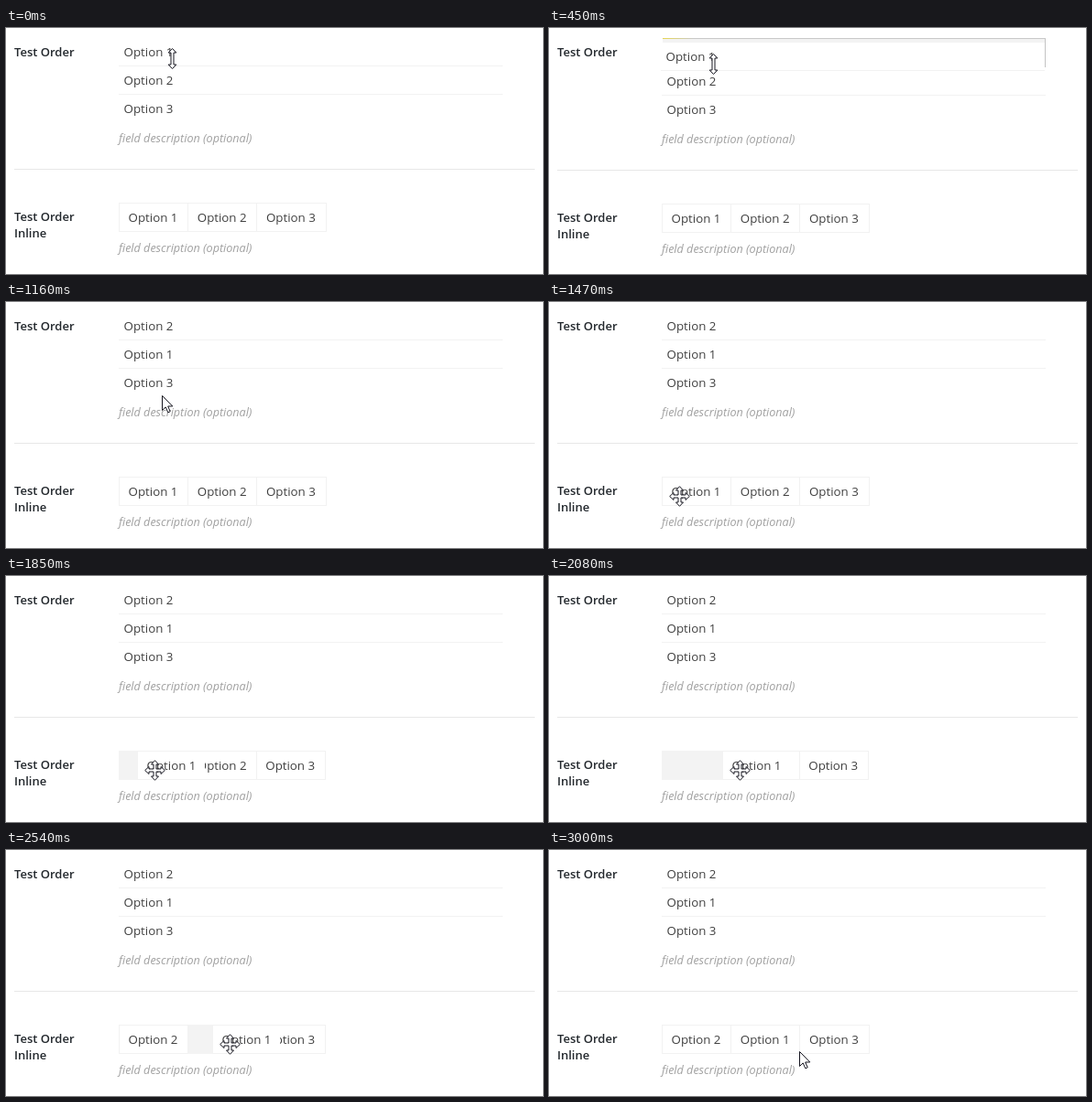
Recreate the animation shown at these times as an HTML page. Size 586 by 269 pixels, loop 3.08 s.

```html
<!DOCTYPE html>
<html lang="en">
<head>
<meta charset="utf-8">
<title>Sortable fields</title>
<style>
  html, body { margin: 0; width: 100%; height: 100%; overflow: hidden; background: #fff; }
  body { position: relative; font: 13.3px/30px "Open Sans", sans-serif; color: #404040; }
  div, svg { position: absolute; box-sizing: border-box; white-space: nowrap; }
  .label { left: 9px; font-size: 13px; line-height: 18px; font-weight: 600; color: #23282d; }
  .note { left: 123px; font-size: 12.6px; line-height: 18px; font-style: italic; color: #a0a0a0; }
  .rule { left: 9px; top: 154px; width: 568px; height: 1px; background: #e7e7e7; }
  .row { width: 419px; height: 31px; padding-left: 5.6px; background: #fff; border-bottom: 1px solid #f2f2f2; }
  .cell { top: 191px; width: 76.2px; height: 32px; padding-left: 9.6px; background: #fff; border: 1px solid #f2f2f2; }
  .cell.held { width: 74px; border-right: 0; z-index: 2; }
  .gap { background: #f3f3f3; }
  #rowGap { left: 124px; width: 418px; height: 32px; border-right: 1px solid #c4c4c4; }
  #rowGap div { left: 0; top: 0; width: 418px; height: 1px; }
  #cellGap { top: 191px; width: 76px; height: 32px; }
  svg { left: 0; top: 0; width: 100%; height: 100%; z-index: 3; }
  path { fill: #fff; stroke: #14141e; stroke-width: 1; }
</style>
</head>
<body>
<div class="label" style="top:17px">Test Order</div>
<div id="rowGap" class="gap"><div></div></div>
<div id="lower" style="left:0">
  <div class="note" style="top:112px">field description (optional)</div>
  <div class="rule"></div>
  <div class="label" style="top:197px">Test Order<br>Inline</div>
  <div id="cellGap" class="gap"></div>
  <div class="note" style="top:232px">field description (optional)</div>
</div>
<svg><path id="cursor"/></svg>
<script>
const LOOP = 3080, PITCH = 75.2;
const SHAPES = {
  resize: "M0-11l4.3 4.5H1.5v13H4.3L0 11l-4.3-4.5H-1.5v-13H-4.3z",
  move: "M0-10.8l4 4.3h-2.5v5h5v-2.5l4.3 4-4.3 4v-2.5h-5v5h2.5l-4 4.3-4-4.3h2.5v-5h-5v2.5l-4.3-4 4.3-4v2.5h5v-5h-2.5z",
  arrow: "M0 0v16l3.7-3.6 2.6 5.9 2.4-1-2.5-5.8h5.1z"
};
const $ = id => document.getElementById(id);
const rowGap = $("rowGap"), cellGap = $("cellGap"), lower = $("lower"), cursor = $("cursor");

function addItems(parent, kind) {
  return [1, 2, 3].map(n => {
    const el = document.createElement("div");
    el.className = kind;
    el.textContent = "Option " + n;
    parent.append(el);
    return el;
  });
}
const rows = addItems(document.body, "row"), cells = addItems(lower, "cell");

// Number of moves made so far, of n spread evenly from a to b
const moves = (t, a, b, n) =>
  t < a ? 0 : Math.min(n, Math.floor((t - a) / (b - a) * (n - 1) + 0.1) + 1);
const mix = (a, b, k) => a + (b - a) * k;
const easeOut = (u, power) => 1 - (1 - u) ** power;

function place(el, x, y) {
  el.style.left = x + "px";
  if (y !== undefined) el.style.top = y + "px";
}
function show(el, on) { el.style.display = on ? "" : "none"; }

function drawRows(t) {
  const dragging = t >= 450 && t < 990;
  const k = (moves(t, 450, 840, 6) - 1) / 5;
  const dx = Math.round(mix(-1, -4, k)), dy = Math.round(mix(5, 43, k));
  const swapped = t >= 450 && dy > 16;
  const slots = swapped ? [1, 0, 2] : [0, 1, 2];
  rows.forEach((el, i) => {
    const slot = slots[i];
    const shift = dragging && slot > slots[0] ? 1 : 0;
    place(el, 123, 11 + 31 * slot + shift);
    el.style.borderBottomColor = slot === 2 ? "transparent" : "";
    el.style.zIndex = 1;
  });
  show(rowGap, dragging);
  if (dragging) {
    place(rows[0], 123 + dx, 11 + dy);
    rows[0].style.zIndex = 2;
    place(rowGap, 124, swapped ? 42 : 11);
    rowGap.firstChild.style.background =
      swapped ? "#e6d64f" : "linear-gradient(90deg, #e6d64f, #c8c8c8 8%)";
  }
  lower.style.top = (dragging ? 1 : 0) + "px";
}

function cellOffset(t) {
  const first = moves(t, 1850, 2310, 7) / 7, second = moves(t, 2390, 2620, 4) / 4;
  return Math.round(88 * easeOut(first, 1.64) + 17 * easeOut(second, 1.25));
}

function drawCells(t) {
  const dragging = t >= 1850 && t < 2770;
  const offset = cellOffset(t), swapped = offset > 93;
  const slots = swapped ? [1, 0, 2] : [0, 1, 2];
  cells.forEach((el, i) =>
    place(el, 123 + PITCH * slots[i] - (dragging && slots[i] === 2 ? 0.7 : 0)));
  cells[0].classList.toggle("held", dragging);
  show(cellGap, dragging);
  if (dragging) {
    place(cells[0], 123 + offset);
    place(cellGap, swapped ? 198 : 123);
  }
}

function pointer(t) {
  if (t < 150) return ["resize", 181.5, 33.5];
  if (t < 450) return ["resize", 181.5, 31.5];
  if (t < 1160) {
    const k = (moves(t, 450, 840, 6) - 1) / 5;
    return ["resize", mix(179.5, 177.5, k), mix(39.5, 74.5, k)];
  }
  if (t < 1850) {
    const k = moves(t, 1160, 1470, 5) / 5;
    return [k < 1 ? "arrow" : "move", mix(177.5, 142.5, k), mix(74.5, 212.5, k)];
  }
  if (t < 3000) return ["move", 142.5 + cellOffset(t), 212.5];
  return ["arrow", 273.5, 220.5];
}

function draw(now) {
  const t = now % LOOP;
  drawRows(t);
  drawCells(t);
  const [shape, x, y] = pointer(t);
  cursor.setAttribute("d", SHAPES[shape]);
  cursor.setAttribute("transform", `translate(${Math.floor(x) + 0.5} ${Math.floor(y) + 0.5})`);
}

const start = performance.now();
function tick() {
  draw(performance.now() - start);
  requestAnimationFrame(tick);
}
tick();
</script>
</body>
</html>
```
